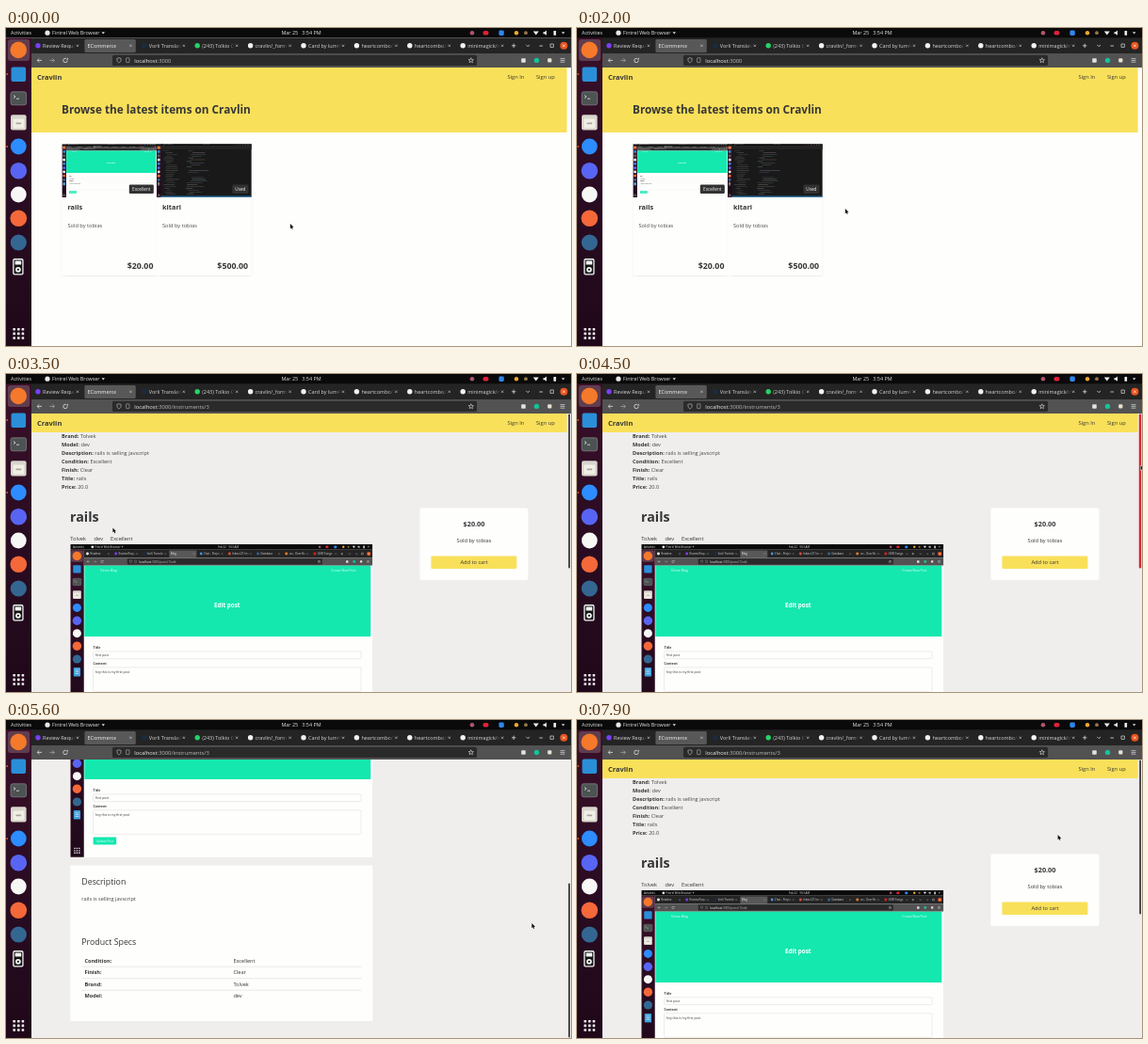
These frames come from a looping animation (600 px wide and 338 px high, 8000 ms). An HTML page with a canvas:

```html
<!DOCTYPE html>
<html lang="en">
<head>
<meta charset="utf-8">
<title>Shop walkthrough</title>
<style>
html, body { margin: 0; width: 100%; height: 100%; overflow: hidden; background: #fefefe; }
canvas { display: block; width: 100vw; height: 100vh; }
</style>
</head>
<body>
<canvas id="stage"></canvas>
<script>
const W = 600, H = 338, LOOP = 8000, STEP = 100;
const canvas = document.getElementById('stage');
const ctx = canvas.getContext('2d');

const YELLOW = '#f9e05a', INK = '#363636', TEAL = '#14e8af', PAPER = '#fefefd';
const STRIP = '#242424', BAR = '#525252', FIELD = '#2a2a2a';
const SHOP = 'Cravlin', SELLER = 'Sold by tobias', MAKER = 'Tolvek';
const MAX_SCROLL = 216;

// Keyframes: time, then values
const CURSOR = [
  [0, 301.8, 208], [600, 301.8, 208], [1500, 293, 200], [2000, 284.8, 192],
  [2600, 113.4, 163.4], [3700, 113.4, 163.4], [3900, 125, 162], [4400, 598.6, 97],
  [4500, 598.6, 97], [4700, 598.6, 196], [4900, 598.6, 228], [5200, 598.6, 228],
  [5400, 575, 220], [5700, 550, 214], [6500, 572, 204], [6700, 598.6, 197],
  [6900, 598.6, 197], [7300, 598.6, 66], [7400, 598.6, 66], [7900, 510.6, 122]
];
const SCROLL = [
  [0, 0], [4500, 0], [4700, 163], [4900, MAX_SCROLL], [6900, MAX_SCROLL], [7300, 0]
];

function at(keys, t) {
  const i = keys.findIndex(k => k[0] > t);
  if (i < 0) return keys[keys.length - 1].slice(1);
  const a = keys[i - 1], b = keys[i], p = (t - a[0]) / (b[0] - a[0]);
  return a.slice(1).map((v, n) => v + (b[n + 1] - v) * p);
}

function seeded(seed) {
  return () => (seed = (seed * 16807) % 2147483647) / 2147483647;
}

function box(x, y, w, h, fill, r = 0) {
  ctx.fillStyle = fill;
  ctx.beginPath();
  ctx.roundRect(x, y, w, h, r);
  ctx.fill();
}

function frame(x, y, w, h, stroke, r = 0, width = 0.5) {
  ctx.strokeStyle = stroke;
  ctx.lineWidth = width;
  ctx.beginPath();
  ctx.roundRect(x, y, w, h, r);
  ctx.stroke();
}

function dot(x, y, r, fill) {
  ctx.fillStyle = fill;
  ctx.beginPath();
  ctx.arc(x, y, r, 0, Math.PI * 2);
  ctx.fill();
}

function line(points, stroke, width = 0.8) {
  ctx.strokeStyle = stroke;
  ctx.lineWidth = width;
  ctx.beginPath();
  points.forEach(([x, y], i) => i ? ctx.lineTo(x, y) : ctx.moveTo(x, y));
  ctx.stroke();
}

function shape(points, fill) {
  ctx.fillStyle = fill;
  ctx.beginPath();
  points.forEach(([x, y]) => ctx.lineTo(x, y));
  ctx.fill();
}

function text(s, x, y, size, fill = INK, weight = 400, align = 'left') {
  ctx.font = `${weight} ${size}px "Open Sans", sans-serif`;
  ctx.fillStyle = fill;
  ctx.textAlign = align;
  ctx.fillText(s, x, y);
  return ctx.measureText(s).width;
}

function clipped(x, y, w, h, draw) {
  ctx.save();
  ctx.beginPath();
  ctx.rect(x, y, w, h);
  ctx.clip();
  draw();
  ctx.restore();
}

function placed(x, y, scale, draw) {
  ctx.save();
  ctx.translate(x, y);
  ctx.scale(scale, scale);
  draw();
  ctx.restore();
}

function cross(x, y, r, color, width) {
  line([[x - r, y - r], [x + r, y + r]], color, width);
  line([[x + r, y - r], [x - r, y + r]], color, width);
}

// Desktop chrome

function topBar(app, date) {
  box(0, 0, W, 10.6, '#0a0a0a');
  text('Activities', 5, 7.2, 5.4, '#e4e4e4');
  dot(44, 5.2, 2.6, '#e8e8e8');
  const w = text(app, 49, 7.2, 5.4, '#e4e4e4');
  shape([[51 + w, 4.3], [54.4 + w, 4.3], [52.7 + w, 6.4]], '#ddd');
  text(date, 313.5, 7.2, 5.4, '#e8e8e8', 400, 'center');
  dot(495, 5.2, 2.3, '#b0566c');
  box(506.5, 3, 6, 4.4, '#e0213a', 2);
  box(523.4, 2.6, 5.4, 5.4, '#2f86f0', 1.4);
  dot(542, 5.2, 2.2, '#f0a92c');
  dot(552, 5.2, 1.9, '#96784c');
  shape([[559.8, 3.4], [565.8, 3.4], [562.8, 7.6]], '#eee');
  shape([[570.5, 4.2], [572, 4.2], [574, 2.6], [574, 7.8], [572, 6.2], [570.5, 6.2]], '#eee');
  box(581.5, 3, 2.6, 4.8, '#eee', 0.5);
  shape([[590, 4.3], [593.4, 4.3], [591.7, 6.4]], '#ddd');
}

function sideBar(lastIsDoc) {
  const g = ctx.createLinearGradient(0, 10, 0, H);
  g.addColorStop(0, '#3a1029');
  g.addColorStop(0.5, '#2a0c22');
  g.addColorStop(1, '#1f0819');
  box(0, 10.6, 27, H - 10.6, g);
  box(1.8, 12, 23.4, 23, '#5f3d4e', 3);
  dot(13.2, 23.4, 8.8, '#f5792a');
  box(5.5, 41.5, 15.6, 15.6, '#2a8fd8', 2);
  box(5, 67.8, 16.6, 14, '#4c5352', 2);
  frame(5, 67.8, 16.6, 14, '#858a88', 2, 0.7);
  line([[8, 71.5], [10, 73], [8, 74.5]], '#e8e8e8');
  line([[11, 75.2], [14, 75.2]], '#e8e8e8');
  box(5, 92.2, 16.6, 16.4, '#d8d5cc', 2);
  box(7.4, 96.6, 11.8, 9.8, '#f1eee6', 1);
  box(10.4, 100.4, 5.8, 1.8, '#a9a69d', 0.6);
  dot(13.3, 126, 8.4, '#2d8cff');
  dot(13.3, 151.8, 8.8, '#5865f2');
  dot(13.3, 177, 8.4, '#f7f7f5');
  dot(13.3, 202.2, 8.8, '#f4683a');
  dot(13.3, 228, 8.6, '#336791');
  if (lastIsDoc) {
    box(6.5, 245, 13.6, 17.5, '#3fa0dc', 1.5);
    [250, 253.5, 257].forEach(y => line([[9.5, y], [17, y]], '#e6f3fb', 1.2));
  } else {
    box(7.2, 245, 11.4, 17.6, '#f4f4f4', 2);
    box(8.5, 246.4, 8.8, 14.8, '#141414', 1);
    box(9.6, 247.6, 6.6, 4, '#f4f4f4', 0.5);
    dot(12.9, 256.8, 2.9, '#f4f4f4');
    dot(12.9, 256.8, 1.1, '#141414');
  }
  [49, 126].forEach(y => dot(1.2, y, 0.9, '#e95420'));
  for (let i = 0; i < 9; i++) {
    box(7.4 + (i % 3) * 4.6, 319 + Math.floor(i / 3) * 4.6, 2.6, 2.6, '#f0eef0', 0.5);
  }
}

function spinner(x, y, t) {
  dot(x + Math.sin(t / 160) * 2, y, 1, '#b9b9b9');
}

function fadingLabel(label, x, y, color) {
  const g = ctx.createLinearGradient(x + 29, 0, x + 37, 0);
  g.addColorStop(0, color);
  g.addColorStop(1, 'transparent');
  clipped(x, y - 9, 37, 14, () => text(label, x, y, 5.5, g));
}

function tabStrip(tabs, active, loading, t) {
  box(27, 10.6, W - 27, 16.6, STRIP);
  tabs.forEach(([label, color], i) => {
    const x = 27 + 56.4 * i, on = i === active, busy = on && loading;
    if (on) box(x, 12, 54.4, 14, '#585858', 1.5);
    if (busy) spinner(x + 5, 18.8, t);
    else if (color) dot(x + 7, 18.8, 2.7, color);
    const left = busy ? 11 : color ? 12 : 3;
    fadingLabel(busy ? 'localhost:3000/inst' : label, x + left, 20.9, on ? '#f5f5f5' : '#d6d6d6');
    cross(x + 49, 18.8, 1.2, '#cfcfcf', 0.6);
  });
  line([[537, 18.8], [541.4, 18.8]], '#ddd');
  line([[539.2, 16.6], [539.2, 21]], '#ddd');
  line([[552.4, 17.9], [554.2, 19.7], [556, 17.9]], '#ddd');
  line([[566.4, 19], [570, 19]], '#ddd');
  frame(578, 17, 3.4, 3.4, '#ddd', 0, 0.7);
  dot(592.4, 18.8, 4, '#e95420');
  cross(592.4, 18.8, 1.3, '#fff', 0.7);
}

function toolbar(url, loading) {
  const c = '#e0e0e0';
  box(27, 27, W - 27, 15, BAR);
  line([[38, 34.4], [33.2, 34.4]], c);
  line([[35.3, 32.3], [33.2, 34.4], [35.3, 36.5]], c);
  line([[46.4, 34.4], [51.4, 34.4]], '#a2a2a2');
  line([[49.3, 32.3], [51.4, 34.4], [49.3, 36.5]], '#a2a2a2');
  if (loading) line([[61.2, 32.6], [64.8, 36.2]], c);
  else {
    ctx.strokeStyle = c;
    ctx.lineWidth = 0.8;
    ctx.beginPath();
    ctx.arc(63, 34.5, 2.2, 0, 5.2);
    ctx.stroke();
    shape([[63.8, 33.6], [65.8, 33.6], [65.8, 31.6]], c);
  }
  box(113, 28.7, 387, 11.4, FIELD, 1.5);
  line([[120, 31.7], [122.2, 32.4], [121.8, 35.4], [120, 37.2], [118.2, 35.4], [117.8, 32.4], [120, 31.7]],
    '#b4b4b4', 0.7);
  frame(127.6, 31.8, 3.4, 4.8, '#b4b4b4', 0.4, 0.6);
  const host = text('localhost', 136.3, 36.5, 5.8, '#f2f2f2');
  text(url, 136.3 + host, 36.5, 5.8, '#bcbcbc');
  const star = [];
  for (let i = 0; i <= 10; i++) {
    const r = i % 2 ? 1.2 : 2.8, a = i * Math.PI / 5 - Math.PI / 2;
    star.push([493.8 + r * Math.cos(a), 34.5 + r * Math.sin(a)]);
  }
  line(star, c, 0.6);
  box(547.2, 32.2, 4.6, 4.6, c, 0.8);
  dot(563.5, 34.4, 2.7, '#15c39a');
  box(575.2, 32.2, 4.2, 4.4, '#e9e0d2', 1);
  [32.6, 34.4, 36.2].forEach(y => line([[588.6, y], [593.4, y]], c, 0.7));
}

function desktop(o, t) {
  topBar(o.app, o.date);
  tabStrip(o.tabs, o.active, o.loading, t);
  toolbar(o.url, o.loading);
  sideBar(o.doc);
}

const MAIN = {
  app: 'Fintrel Web Browser', date: 'Mar 25   3:54 PM', active: 1,
  tabs: [
    ['Review Requests', '#7b3ff2'], ['ECommerce'], ['Vorli Translate', '#1a2c42'],
    ['(243) Tolkio Chat', '#25d366'], ['cravlin/_form.html', '#f2f2f2'],
    ['Card by lum42 on', '#f2f2f2'], ['heartcombo/simple', '#f2f2f2'],
    ['heartcombo/simple', '#f2f2f2'], ['minimagick/minimagick', '#f2f2f2']
  ]
};

const INNER = {
  app: 'Fintrel Web Browser', date: 'Feb 22   9:53 AM', active: 3,
  url: ':3000/posts/1/edit', doc: true,
  tabs: [
    ['Readme', '#f2f2f2'], ['Review Requests', '#7b3ff2'], ['Vorli Translate', '#1a2c42'],
    ['Blog'], ['Chat - Project', '#4a90d8'], ['Inbox (21) mail', '#e04a3c'],
    ['Database', '#336791'], ['css - Overflow', '#f08030'], ['(608) Songs', '#e02020']
  ]
};

// Pictures inside the pages

function blogShot(x, y, scale) {
  placed(x, y, scale, () => clipped(0, 0, 321, 181, () => {
    box(0, 0, 321, 181, PAPER);
    box(15, 22.4, 304, 75.6, TEAL);
    placed(0, 0, 0.535, () => desktop(INNER, 0));
    text('Demo Blog', 32, 29.2, 3.4, '#eafff8');
    text('Create New Post', 277, 29.2, 3.4, '#eafff8');
    text('Edit post', 166.5, 67.3, 6.3, '#fff', 700, 'center');
    text('Title', 24.3, 111.4, 3.5, INK, 700);
    frame(24.3, 113.8, 284.5, 7.8, '#dadada', 1);
    text('first post', 26.8, 119, 3.4);
    text('Content', 24.3, 128.4, 3.5, INK, 700);
    frame(24.3, 130.8, 284.5, 25.6, '#dadada', 1);
    text('hey this is my first post', 26.8, 137, 3.4);
    box(24.3, 159.4, 24.6, 8, TEAL, 0.8);
    text('Update Post', 36.6, 164.6, 3.1, '#fff', 400, 'center');
  }));
}

function codeShot(x, y, w, h) {
  const rnd = seeded(77);
  const inks = ['#4c5462', '#5c5044', '#45564a', '#50485a'];
  clipped(x, y, w, h, () => {
    box(x, y, w, h, '#191919');
    placed(x, y, w / W, () => {
      box(0, 10, W, 24, '#232323');
      sideBar(false);
      topBar(INNER.app, INNER.date);
    });
    for (let i = 0; i < 25; i++) {
      const ly = y + 7 + i * 1.9;
      box(x + 7 + rnd() * 4, ly, 5 + rnd() * 9, 0.6, '#464646');
      if (rnd() < 0.72) box(x + 31 + rnd() * 7, ly, 5 + rnd() * 16, 0.6, inks[Math.floor(rnd() * 4)]);
    }
    box(x + 4.6, y + h - 1.4, w - 4.6, 1.4, '#1673b4');
  });
}

// Pages

function navBar(h) {
  box(27, 42, 568.6, h, YELLOW);
  text(SHOP, 33, 54.6, 7.5, INK, 700);
  text('Sign In', 532.5, 54, 5.7);
  text('Sign up', 563, 54, 5.7);
}

function itemCard(x, title, badge, badgeW, price, picture) {
  ctx.save();
  ctx.shadowColor = 'rgba(10,10,10,0.12)';
  ctx.shadowBlur = 1.6 * canvas.width / W;
  ctx.shadowOffsetY = 0.5 * canvas.width / W;
  box(x, 123.4, 100.6, 140.2, PAPER);
  ctx.restore();
  picture();
  box(x + 97.4 - badgeW, 166.6, badgeW, 9.4, '#323232', 1.2);
  text(badge, x + 97.4 - badgeW / 2, 173, 4.7, '#f4f4f4', 400, 'center');
  text(title, x + 6, 192.8, 7.4, INK, 700);
  text(SELLER, x + 6, 212, 5.7, '#4a4a4a');
  text(price, x + 97, 256.4, 8.8, INK, 700, 'right');
}

function listPage() {
  box(27, 42, W - 27, H - 42, PAPER);
  navBar(69);
  text(`Browse the latest items on ${SHOP}`, 59, 91, 11.75, INK, 700);
  itemCard(59.4, 'rails', 'Excellent', 26, '$20.00', () => blogShot(59.4, 123.2, 0.3135));
  itemCard(160, 'kitari', 'Used', 17, '$500.00', () => codeShot(160, 123.2, 100.8, 56.6));
}

function field(label, value, y) {
  const w = text(label + ':', 59, y, 5.6, INK, 700);
  text(value, 60.6 + w, y, 5.6, '#444');
}

function itemPage(scroll, dragging) {
  box(27, 42, W - 27, H - 42, '#efeeed');
  clipped(27, 42, W - 27, H - 42, () => placed(0, -scroll, 1, () => {
    navBar(20);
    [['Brand', MAKER], ['Model', 'dev'], ['Description', 'rails is selling javscript'],
      ['Condition', 'Excellent'], ['Finish', 'Clear'], ['Title', 'rails'], ['Price', '20.0']]
      .forEach(([k, v], i) => field(k, v, 68.3 + i * 9));
    text('rails', 68, 157, 14.3, INK, 700);
    text(MAKER, 68.3, 177, 5.7);
    text('dev', 93.6, 177, 5.7);
    text('Excellent', 111, 177, 5.7);

    box(439.4, 142.5, 115, 76.5, PAPER, 2);
    text('$20.00', 497, 162, 7.3, INK, 700, 'center');
    text(SELLER, 497, 178.8, 5.7, INK, 400, 'center');
    box(451.4, 193.6, 91, 13.4, YELLOW, 1);
    text('Add to cart', 497, 202.3, 5.7, INK, 400, 'center');

    blogShot(68.3, 181, 1);

    box(68.3, 370.4, 321, 165.6, PAPER);
    text('Description', 80.3, 391.2, 8.8);
    text('rails is selling javscript', 80.3, 408, 5.6, '#444');
    text('Product Specs', 80.3, 455.2, 8.8);
    [['Condition', 'Excellent'], ['Finish', 'Clear'], ['Brand', MAKER], ['Model', 'dev']]
      .forEach(([k, v], i) => {
        const y = 473.8 + i * 12.5;
        text(k + ':', 83.4, y, 5.6, INK, 700);
        text(v, 241.4, y, 5.6);
        if (i < 3) line([[80.3, y + 4.4], [377.4, y + 4.4]], '#dbdbdb', 0.6);
      });
  }));
  const top = 42.4 + scroll / MAX_SCROLL * 131;
  box(dragging ? 596.8 : 597.2, top, dragging ? 2.4 : 1.8, 164, dragging ? '#dc2630' : '#3a3a3a', 1);
}

function pointer(x, y) {
  placed(x, y, 1, () => {
    const tip = [[0, 0], [0, 5.2], [1.2, 4.2], [2, 6], [2.9, 5.6], [2.1, 3.9], [3.7, 3.8], [0, 0]];
    line(tip, '#fff', 0.9);
    shape(tip, '#111');
  });
}

function draw(t) {
  const loading = t >= 2800 && t < 3300;
  const onItem = t >= 3300;
  const dragging = (t >= 4500 && t < 5300) || (t >= 6900 && t < 7400);
  if (onItem) itemPage(at(SCROLL, t)[0], dragging);
  else listPage();
  const url = loading || onItem ? ':3000/instruments/3' : ':3000';
  desktop({ ...MAIN, url, loading }, t);
  if (loading) {
    box(27, 330, 121, 8, '#383838', 0.8);
    text('Transferring data from localhost…', 28.6, 336, 5.4, '#f0f0f0');
  }
  pointer(...at(CURSOR, t));
}

function tick(now) {
  const dpr = window.devicePixelRatio || 1;
  const w = Math.round(W * dpr), h = Math.round(H * dpr);
  if (canvas.width !== w || canvas.height !== h) {
    canvas.width = w;
    canvas.height = h;
  }
  ctx.setTransform(dpr, 0, 0, dpr, 0, 0);
  draw(Math.floor((now % LOOP) / STEP) * STEP);
  requestAnimationFrame(tick);
}
requestAnimationFrame(tick);
</script>
</body>
</html>
```
